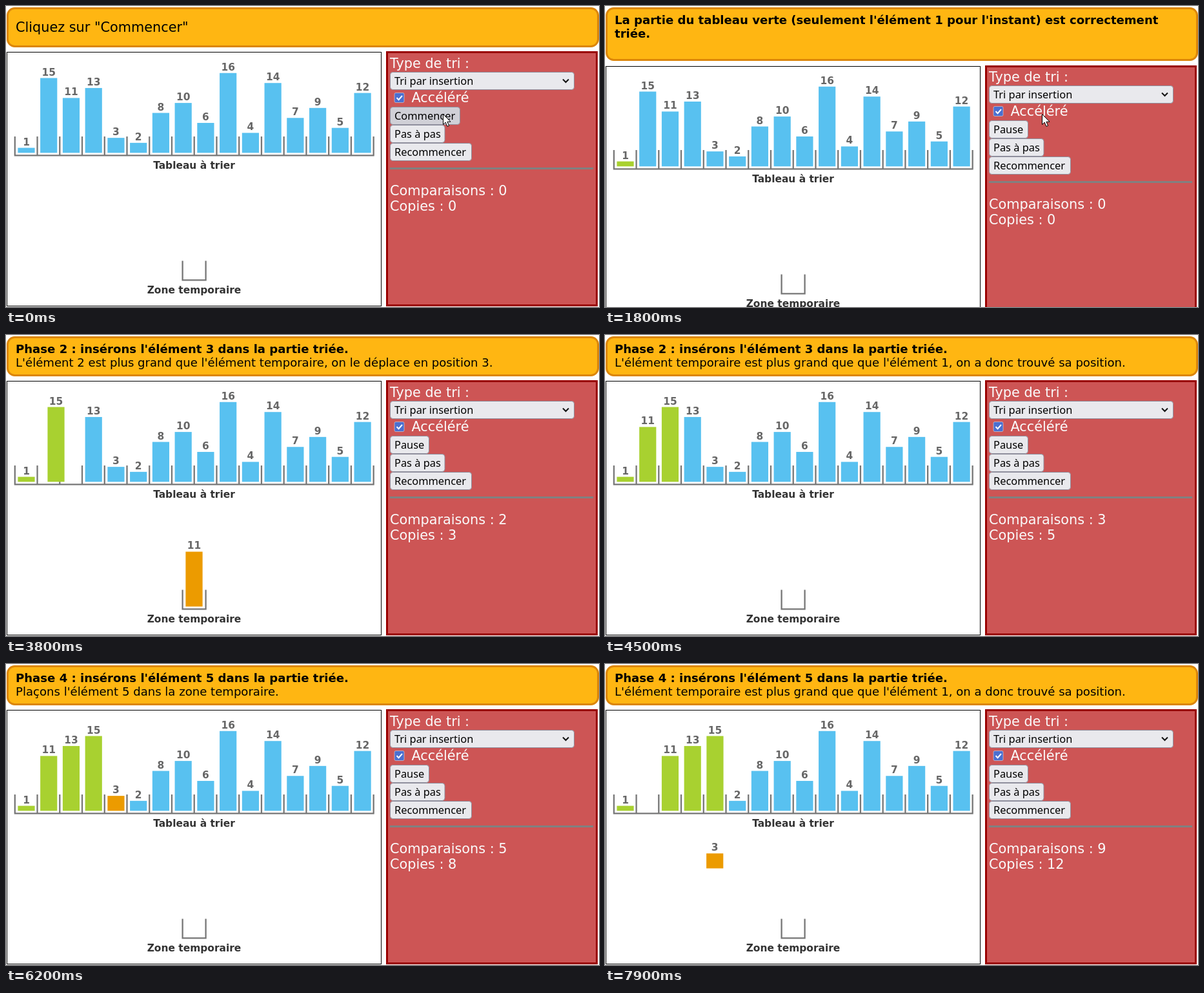
An HTML page for the animation above (8 s loop, 919 by 466 pixels).

```html
<!DOCTYPE html>
<html lang="fr">
<head>
<meta charset="utf-8">
<title>Tri par insertion</title>
<style>
  html, body { margin: 0; width: 100%; height: 100%; overflow: hidden; background: #fff; }
  svg { display: block; }
  text { font-family: "DejaVu Sans", sans-serif; font-size: 20.8px; }
  .note { font-size: 18.08px; }
  .bold { font-weight: bold; }
  .panel { fill: #fafafa; }
  .control { font-family: "Noto Sans", sans-serif; font-size: 16.4px; fill: #000; }
  .label { font-size: 15.44px; font-weight: bold; text-anchor: middle; fill: #333; }
  .value { fill: #666; }
</style>
</head>
<body>
<svg id="stage" width="919" height="466"></svg>
<script>
const LOOP = 8000, STEP = 100, TEMP = -1;
const BLUE = '#58c1f0', GREEN = '#a8d130', ORANGE = '#ec9b00';
const START = [1, 15, 11, 13, 3, 2, 8, 10, 6, 16, 4, 14, 7, 9, 5, 12];
const PITCH = 34.74, UNIT = 7.72, BAR = 26.2;

// ---- timeline: each event edits the state once its time has come ----
const events = [];
const at = (time, apply) => events.push({ time, apply });
const spot = slot => slot === TEMP ? [291.5, 420.4] : [31.5 + PITCH * slot, 227.3];

function move(value, from, to, [start, end], done = () => {}) {
  const a = spot(from), b = spot(to);
  at(start, (s, now) => {
    const p = Math.min(1, (now - start) / (end - start));
    s.bars[value].pos = a.map((v, i) => v + (b[i] - v) * p);
    if (p === 1) { s.copies++; done(s); }
  });
}

const order = [...START];

// shifts: [text time, move start, move end] for every element pushed right
function phase(n, { title, place, lift, shifts, found, drop }) {
  const value = order[n];
  at(title, s => {
    s.title = [`Phase ${n} : insérons l'élément ${n + 1} dans la partie triée.`];
    s.intro = false;
    s.bars[value].color = ORANGE;
  });
  at(place, s => s.note = `Plaçons l'élément ${n + 1} dans la zone temporaire.`);
  move(value, n, TEMP, lift);
  let hole = n;
  for (const [time, ...span] of shifts) {
    const k = hole--;
    at(time, s => {
      s.note = `L'élément ${k} est plus grand que l'élément temporaire, on le déplace en position ${k + 1}.`;
      s.comparisons++;
    });
    move(order[k - 1], k - 1, k, span);
    order[k] = order[k - 1];
  }
  order[hole] = value;
  at(found, s => s.note =
    `L'élément temporaire est plus grand que que l'élément ${hole}, on a donc trouvé sa position.`);
  at(drop[0], s => s.comparisons++);
  move(value, TEMP, hole, drop, s => s.bars[value].color = GREEN);
}

at(1400, s => s.pressed = true);
at(1700, s => s.running = true);
at(1800, s => {
  s.title = ["La partie du tableau verte (seulement l'élément 1 pour l'instant) est correctement", 'triée.'];
  s.intro = true;
  s.bars[1].color = GREEN;
});
at(2000, s => s.cursor = false);
phase(1, { title: 1900, place: 2000, lift: [2050, 2350], shifts: [], found: 2400, drop: [2650, 2900] });
phase(2, { title: 3100, place: 3300, lift: [3350, 3600], shifts: [[3700, 3735, 3935]],
  found: 4000, drop: [4130, 4400] });
phase(3, { title: 4600, place: 4700, lift: [4750, 5000], shifts: [[5100, 5235, 5400]],
  found: 5400, drop: [5560, 5850] });
phase(4, { title: 6000, place: 6200, lift: [6250, 6500],
  shifts: [[6600, 6650, 6850], [7000, 7050, 7250], [7300, 7350, 7550]],
  found: 7700, drop: [7760, 8020] });

function stateAt(now) {
  const s = { title: null, note: '', intro: false, pressed: false, running: false, cursor: true,
    comparisons: 0, copies: 0, bars: {} };
  START.forEach((v, i) => s.bars[v] = { value: v, pos: spot(i), color: BLUE });
  for (const e of events) if (e.time <= now) e.apply(s, now);
  return s;
}

// ---- drawing ----
const rect = (x, y, w, h, fill, more = '') =>
  `<rect x="${x}" y="${y}" width="${w}" height="${h}" fill="${fill}" ${more}/>`;
const text = (x, y, str, cls = '') => `<text x="${x}" y="${y}" class="${cls}">${str}</text>`;
const path = (d, more) => `<path d="${d}" ${more}/>`;
const group = (dy, ...parts) => `<g transform="translate(0 ${dy})">${parts.join('')}</g>`;
const control = (y, w, str, fill = '#e9e9ed') =>
  rect(595.5, y, w, 27, fill, 'rx="4" stroke="#8f8f9d"') + text(602, y + 19, str, 'control');

function banner(s) {
  const lines = s.title
    ? s.title.map((line, i) => text(15, 28 + 21 * i, line, 'note bold')).join('') + text(15, 49, s.note, 'note')
    : text(15, 40, 'Cliquez sur "Commencer"');
  return rect(2.5, 3.5, 915, s.intro ? 80 : 59, '#ffb612', 'rx="11" stroke="#dc860a" stroke-width="3"') + lines;
}

function bar({ value, pos: [x, y], color }) {
  const h = value * UNIT;
  return rect(x - BAR / 2, y - h, BAR, h, color) + text(x, y - h - 4, value, 'label value');
}

function board(s) {
  let walls = 'M12.7 231.3H570.7M273.6 394.5V424.3H309.6V394.5';
  for (let i = 0; i <= 16; i++) walls += `M${13.8 + PITCH * i} 202V231`;
  const bars = Object.values(s.bars).sort((a, b) => (a.color === ORANGE) - (b.color === ORANGE));
  return path(walls, 'fill="none" stroke="#777" stroke-width="2.3"')
    + text(291.5, 251.5, 'Tableau à trier', 'label')
    + text(291.5, 444.5, 'Zone temporaire', 'label')
    + bars.map(bar).join('');
}

function panel(s) {
  return text(595, 96, 'Type de tri :', 'panel')
    + control(102.5, 285, 'Tri par insertion')
    + path('M863 113.5l4.5 4.5 4.5-4.5', 'fill="none" stroke="#111" stroke-width="2"')
    + rect(602, 134.5, 15, 15, '#4a6fd0', 'rx="2" stroke="#ddd" stroke-width=".6"')
    + path('M605.5 142l3 3.2 5.5-6.2', 'fill="none" stroke="#fff" stroke-width="2"')
    + text(628.5, 149, 'Accéléré', 'panel')
    + (s.running ? control(156.5, 60, 'Pause')
      : control(156.5, 108, 'Commencer', s.pressed ? '#b1b1b9' : '#d0d0d7'))
    + control(184.5, 84.5, 'Pas à pas')
    + control(212.5, 126, 'Recommencer')
    + rect(595, 250, 315, 3, '#808080')
    + text(595, 293, `Comparaisons : ${s.comparisons}`, 'panel')
    + text(595, 317, `Copies : ${s.copies}`, 'panel');
}

const stage = document.getElementById('stage');

function render(s) {
  const frameDy = s.intro ? 22 : 0, dy = s.intro ? 21 : 0;
  stage.innerHTML = banner(s)
    + group(frameDy,
      rect(1.5, 71.5, 580, 393, '#fff', 'stroke="#000"'),
      rect(590.5, 71.5, 325, 392, '#cd5555', 'stroke="#900" stroke-width="3"'))
    + group(dy, board(s), panel(s))
    + (s.cursor ? path('M677.5 167.5v16l3.7-3.4 2.7 6.3 2.7-1.1-2.7-6.1h5.1z', 'fill="#fff" stroke="#000"') : '');
}

let shown = -1;
function tick() {
  const now = Math.floor(performance.now() % LOOP / STEP) * STEP;
  if (now !== shown) render(stateAt(shown = now));
  requestAnimationFrame(tick);
}
tick();
</script>
</body>
</html>
```
